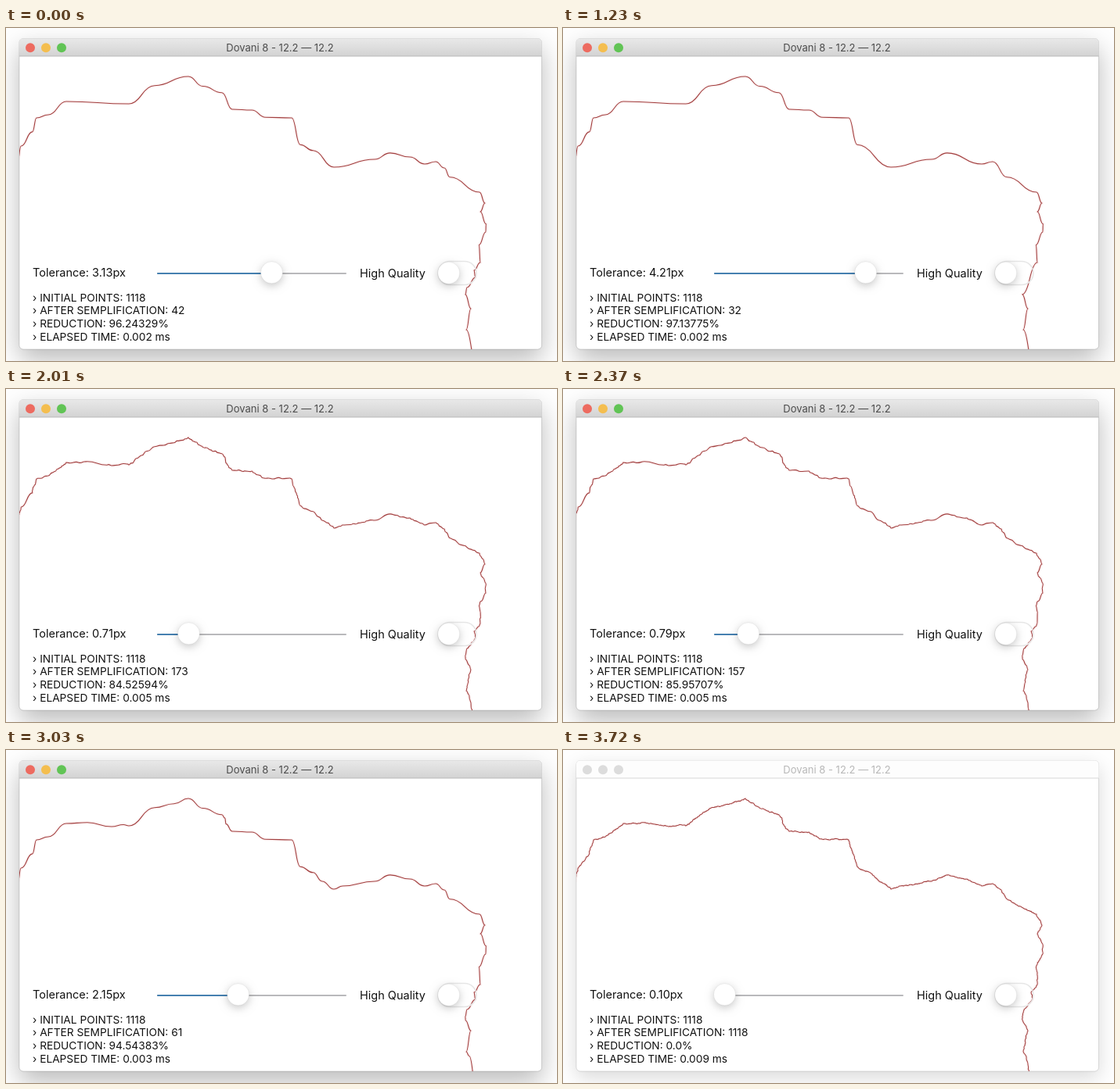
An HTML page with a canvas for the animation above (4.11 s loop, 704 by 426 pixels).

```html
<!DOCTYPE html>
<html lang="en">
<head>
<meta charset="utf-8">
<title>Line simplification</title>
<style>
  html, body { margin: 0; width: 100%; height: 100%; overflow: hidden; background: #fff; }
  canvas { display: block; }
</style>
</head>
<body>
<canvas id="stage" width="704" height="426"></canvas>
<script>
const ctx = document.getElementById('stage').getContext('2d');
const LOOP = 4110, STEP = 30, BLUR_AT = 3720, TOTAL = 1118;
const MIN_TOL = 0.1, MAX_TOL = 5, START_TOL = 3.13;
const FONT = 'Inter, "Open Sans", sans-serif';

// Slider drags; the knob rests between them.
const DRAGS = [
  { from: 0, to: 480, tolerance: MAX_TOL },
  { from: 872, to: 2230, tolerance: 0.39 },
  { from: 2230, to: 2760, tolerance: 2.71 },
  { from: 2790, to: 3596, tolerance: MIN_TOL }
];

// Main bends of the outline; everything finer is generated.
const BENDS = [
  15,169, 20,150, 33,134, 39,115, 62,106, 77,94, 118,95, 135,98, 157,97, 187,75,
  233,62, 253,75, 277,84, 282,96, 289,104, 314,105, 327,113, 365,115, 377,150, 398,162,
  419,178, 430,174, 471,168, 490,160, 516,165, 535,174, 549,171, 560,179, 568,191,
  605,210, 612,224, 606,235, 613,249, 613,261, 605,276, 606,300, 598,310, 600,318,
  589,332, 587,345, 594,359, 588,386, 600,426
];

let seed = 41;
function random() {
  seed = (seed * 16807) % 2147483647;
  return seed / 2147483647;
}

// Adds ever finer wiggles between two points by midpoint displacement.
function roughen(a, b, out) {
  const dx = b.x - a.x, dy = b.y - a.y, d = Math.hypot(dx, dy);
  if (d < 1.6) return;
  const shift = (random() * 2 - 1) * Math.min(1, 0.1 * d + 0.15) / d;
  const mid = { x: (a.x + b.x) / 2 - dy * shift, y: (a.y + b.y) / 2 + dx * shift };
  roughen(a, mid, out);
  out.push(mid);
  roughen(mid, b, out);
}

// Douglas-Peucker: stores for every point the tolerance at which it drops out.
function rank(pts, first, last, limit) {
  if (last - first < 2) return;
  const a = pts[first], b = pts[last];
  const dx = b.x - a.x, dy = b.y - a.y, length = Math.hypot(dx, dy);
  let far = first + 1, max = -1;
  for (let i = first + 1; i < last; i++) {
    const d = Math.abs(dx * (pts[i].y - a.y) - dy * (pts[i].x - a.x)) / length;
    if (d > max) { max = d; far = i; }
  }
  const weight = Math.min(limit, max * 1.4);
  pts[far].weight = weight;
  rank(pts, first, far, weight);
  rank(pts, far, last, weight);
}

function buildOutline() {
  const pts = [{ x: BENDS[0], y: BENDS[1] }];
  for (let i = 2; i < BENDS.length; i += 2) {
    const bend = { x: BENDS[i], y: BENDS[i + 1] };
    roughen(pts[pts.length - 1], bend, pts);
    pts.push(bend);
  }
  const last = pts.length - 1;
  pts[0].weight = pts[last].weight = Infinity;
  rank(pts, 0, last, Infinity);
  return pts;
}
const outline = buildOutline();

const ease = u => u * u * (3 - 2 * u);

function toleranceAt(t) {
  let value = START_TOL;
  for (const { from, to, tolerance } of DRAGS) {
    const u = Math.max(0, Math.min(1, (t - from) / (to - from)));
    value += (tolerance - value) * ease(u);
  }
  return value;
}

const pointsLeft = tolerance => Math.round(TOTAL * Math.pow(MIN_TOL / tolerance, 0.95));
const elapsedMs = tolerance => Math.round(18 * Math.pow(tolerance, -0.1) - 13.75) / 1000;

function text(str, x, y, size, color = '#111', align = 'left') {
  ctx.font = `${size}px ${FONT}`;
  ctx.textAlign = align;
  ctx.fillStyle = color;
  ctx.fillText(str, x, y);
}

function roundRect(x, y, w, h, r) {
  ctx.beginPath();
  ctx.roundRect(x, y, w, h, r);
}

function bar(x, y, w, h, color) {
  roundRect(x, y, w, h, h / 2);
  ctx.fillStyle = color;
  ctx.fill();
}

function shadow(color, blur, dy) {
  ctx.shadowColor = color;
  ctx.shadowBlur = blur;
  ctx.shadowOffsetY = dy;
}

function disc(x, y, r, color) {
  ctx.beginPath();
  ctx.arc(x, y, r, 0, 7);
  ctx.fillStyle = color;
  ctx.fill();
}

function knob(x, y) {
  ctx.save();
  shadow('rgba(0,0,0,.22)', 11, 3);
  disc(x, y, 14, '#fff');
  ctx.restore();
  ctx.lineWidth = 0.5;
  ctx.strokeStyle = 'rgba(0,0,0,.13)';
  ctx.stroke();
}

function drawWindow(active) {
  ctx.fillStyle = '#fff';
  ctx.fillRect(0, 0, 704, 426);
  ctx.save();
  if (active) shadow('rgba(0,0,0,.27)', 32, 13);
  else shadow('rgba(0,0,0,.15)', 24, 8);
  roundRect(17, 13.5, 667.5, 397.5, 5);
  ctx.fillStyle = '#fff';
  ctx.fill();
  ctx.restore();
  ctx.lineWidth = 0.7;
  ctx.strokeStyle = active ? 'rgba(0,0,0,.22)' : 'rgba(0,0,0,.18)';
  ctx.stroke();

  const title = ctx.createLinearGradient(0, 13, 0, 36);
  title.addColorStop(0, active ? '#e9e9e9' : '#fdfdfd');
  title.addColorStop(1, active ? '#d3d3d3' : '#fdfdfd');
  roundRect(17, 13.5, 667.5, 22.5, [5, 5, 0, 0]);
  ctx.fillStyle = title;
  ctx.fill();
  ctx.fillStyle = active ? '#b9b9b9' : '#d8d8d8';
  ctx.fillRect(17, 35.5, 667.5, 1);

  ['#ed6b60', '#f4be4f', '#61c455'].forEach((color, i) =>
    disc(31 + 20 * i, 25.2, 6, active ? color : '#dcdcdc'));
  text('Dovani 8 - 12.2 — 12.2', 350, 30, 13, active ? '#4c4c4c' : '#b8b8b8', 'center');
}

function drawOutline(tolerance) {
  const pts = outline.filter(p => p.weight >= tolerance);
  ctx.save();
  ctx.beginPath();
  ctx.rect(17, 37, 667, 374);
  ctx.clip();
  ctx.beginPath();
  ctx.moveTo(pts[0].x, pts[0].y);
  for (let i = 1; i < pts.length; i++) {
    const a = pts[i - 1], b = pts[i];
    ctx.quadraticCurveTo((3 * a.x + b.x) / 4, a.y, (a.x + b.x) / 2, (a.y + b.y) / 2);
    ctx.quadraticCurveTo((a.x + 3 * b.x) / 4, b.y, b.x, b.y);
  }
  ctx.lineJoin = 'round';
  ctx.lineWidth = 4;
  ctx.strokeStyle = 'rgba(220,60,60,.05)';
  ctx.stroke();
  ctx.lineWidth = 1.1;
  ctx.strokeStyle = '#a03e3e';
  ctx.stroke();
  ctx.restore();
}

function drawControls(tolerance) {
  const x = 206.5 + 215 * (tolerance - MIN_TOL) / (MAX_TOL - MIN_TOL);
  bar(193, 313, 242, 2, '#b9b9bb');
  bar(193, 313, x - 193, 2, '#4580b0');
  knob(x, 312.8);

  roundRect(552, 298.5, 49, 30, 15);
  ctx.lineWidth = 1.5;
  ctx.strokeStyle = '#e6e6e6';
  ctx.stroke();
  knob(565.7, 313.3);

  text(`Tolerance: ${tolerance.toFixed(2)}px`, 34, 318, 14.5);
  text('High Quality', 452, 319, 14.5);

  const left = pointsLeft(tolerance);
  const reduction = left === TOTAL ? '0.0' : ((1 - left / TOTAL) * 100).toFixed(5);
  [
    `INITIAL POINTS: ${TOTAL}`,
    `AFTER SEMPLIFICATION: ${left}`,
    `REDUCTION: ${reduction}%`,
    `ELAPSED TIME: ${elapsedMs(tolerance).toFixed(3)} ms`
  ].forEach((line, i) => text('› ' + line, 34, 349.5 + 16.7 * i, 13.72));
}

const start = performance.now();
function tick() {
  const t = Math.floor((performance.now() - start) % LOOP / STEP) * STEP;
  const tolerance = toleranceAt(t);
  drawWindow(t < BLUR_AT);
  drawOutline(tolerance);
  drawControls(tolerance);
  requestAnimationFrame(tick);
}
tick();
</script>
</body>
</html>
```
